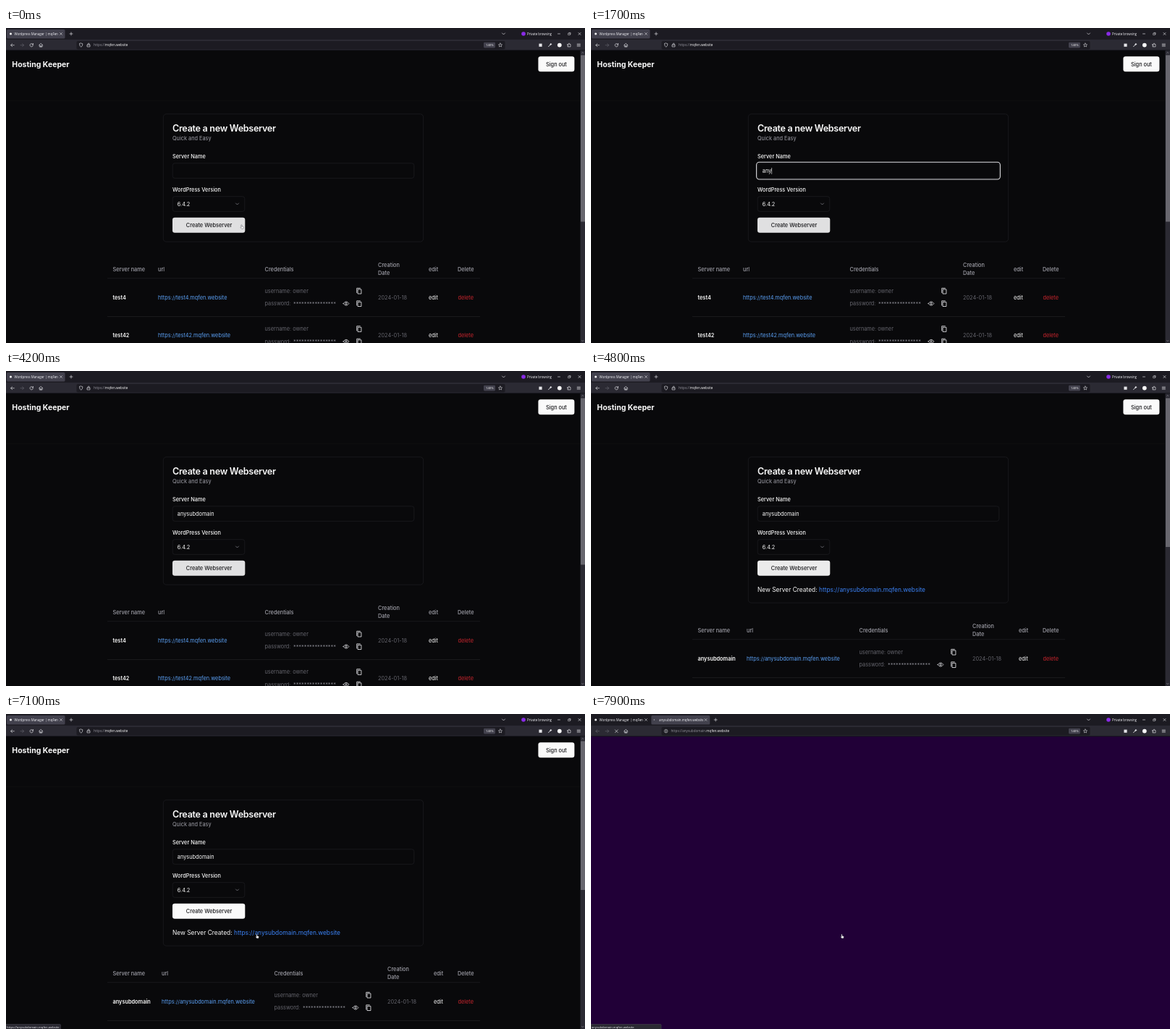
An HTML page with a canvas that plays this animation: 800 px wide and 435 px high, repeating every 8 s.

```html
<!DOCTYPE html>
<html lang="en">
<head>
<meta charset="utf-8">
<title>Web server panel</title>
<style>
  html, body { margin: 0; width: 100%; height: 100%; overflow: hidden; background: #09090b; }
  canvas { display: block; width: 100vw; height: 100vh; }
</style>
</head>
<body>
<canvas></canvas>
<script>
const W = 800, H = 435, LOOP = 8000;
const canvas = document.querySelector('canvas');
const ctx = canvas.getContext('2d');
const dpr = window.devicePixelRatio || 1;
canvas.width = W * dpr;
canvas.height = H * dpr;

const PAGE = 'Inter, sans-serif', CHROME = '"Open Sans", "Noto Sans", sans-serif';
const WHITE = '#fafafa', MUTED = '#a1a1aa', DIM = '#65656d', LINE = '#232327';
const BAR = '#1c1b22', TOOLBAR = '#2b2a33', ICON = '#e4e4e8';
const DOMAIN = 'mqfen.website', NAME = 'anysubdomain', PAGE_TITLE = 'Wordpress Manager | mqFen';

// Times at which each letter of NAME is typed.
const KEYS = [1400, 1600, 1700, 1900, 2000, 2100, 2200, 2400, 2500, 2600, 2800, 2900];
const FOCUS = 1000, CARET_OFF = 3300, SUBMIT = 3600, CREATED = 4500;
const MOVE = 6700, ARRIVE = 7000, NEW_TAB = 7200, CONNECT = 7400;

const clamp = v => Math.max(0, Math.min(1, v));
const lerp = (a, b, p) => a + (b - a) * p;
const easeOut = p => 1 - (1 - p) ** 3;

// Text is placed by the vertical centre of its capitals; returns its width.
function text(s, x, y, color = WHITE, size = 7.35, weight = 400, family = PAGE) {
  ctx.font = `${weight} ${size}px ${family}`;
  ctx.fillStyle = color;
  ctx.fillText(s, x, y + size * 0.36);
  return ctx.measureText(s).width;
}
const ui = (s, x, y, color = '#f4f4f8', size = 4.4) => text(s, x, y, color, size, 400, CHROME);

function rect(x, y, w, h, color) {
  ctx.fillStyle = color;
  ctx.fillRect(x, y, w, h);
}
function box(x, y, w, h, r, fill, stroke, lw = 0.6) {
  ctx.beginPath();
  ctx.roundRect(x, y, w, h, r);
  if (fill) { ctx.fillStyle = fill; ctx.fill(); }
  if (stroke) { ctx.strokeStyle = stroke; ctx.lineWidth = lw; ctx.stroke(); }
}
function dot(x, y, r, fill, stroke, lw = 0.6) {
  box(x - r, y - r, 2 * r, 2 * r, r, fill, stroke, lw);
}
// Strokes an SVG path around (x, y).
function icon(d, x, y, color = ICON, lw = 0.65, fill) {
  ctx.save();
  ctx.translate(x, y);
  ctx.lineWidth = lw;
  ctx.lineCap = ctx.lineJoin = 'round';
  const path = new Path2D(d);
  if (fill) { ctx.fillStyle = fill; ctx.fill(path); }
  ctx.strokeStyle = color;
  ctx.stroke(path);
  ctx.restore();
}
const CROSS = 'M-1.5-1.5L1.5 1.5M1.5-1.5L-1.5 1.5';
const PLUS = 'M-2 0H2M0-2V2';
const CHEVRON = 'M-2-1L0 1L2-1';

function tab(x, w, selected) {
  if (selected) box(x, 2, w, 12.5, 1.6, '#42414d');
}

function tabBar(t) {
  const loading = t >= NEW_TAB;
  rect(0, 0, W, 16, BAR);
  tab(1, 80.5, !loading);
  dot(6.5, 8, 1.5, WHITE);
  ui(PAGE_TITLE, 11.5, 8);
  icon(CROSS, 76, 8, ICON, 0.55);

  let plusX = 90;
  if (loading) {
    const w = lerp(8.5, 81, easeOut(clamp((t - NEW_TAB) / 100)));
    tab(83.3, w, true);
    dot(88 - 0.75 + 1.5 * (0.5 - 0.5 * Math.cos((t - NEW_TAB) / 700 * 2 * Math.PI)), 8, 0.7, '#bcbcc6');
    if (w > 60) {
      ctx.save();
      ctx.beginPath();
      ctx.rect(94, 2, 61, 13);
      ctx.clip();
      ui(`${NAME}.${DOMAIN}/`, 94, 8);
      ctx.restore();
      icon(CROSS, 158.5, 8, ICON, 0.55);
    }
    plusX = 83.3 + w + 7.9;
  }
  icon(PLUS, plusX, 8);

  icon(CHEVRON, 687.5, 8);
  dot(715, 8, 2.8, '#8a2be8');
  ui('Private browsing', 720, 8);
  icon('M-1.5 0H1.5', 764, 8);
  icon('M-1.5-.7H.8V1.6H-1.5ZM-.7-.9V-1.6H1.6V.8H1', 778.5, 8, ICON, 0.5);
  icon(CROSS, 792.5, 8);
}

function toolbar(loading) {
  rect(0, 16, W, 15, TOOLBAR);
  rect(0, 30.5, W, 0.7, '#0b0b10');
  const off = '#65646e';
  icon('M2.3 0H-2.3M-.3-2L-2.3 0L-.3 2', 9, 23.7, loading ? off : ICON);
  icon('M-2.3 0H2.3M.3-2L2.3 0L.3 2', 22.3, 23.7, off);
  if (loading) icon('M-1.9-1.9L1.9 1.9M1.9-1.9L-1.9 1.9', 35.2, 23.7);
  else icon('M2.1-.8A2.2 2.2 0 1 0 2.2.5M2.3-2.3V-.7H.7', 35.2, 23.7);
  icon('M-2.6 0L0-2.4L2.6 0M-1.9-.4V2.3H1.9V-.4M-.4 2.1V.7H.5V2.1', 48.2, 23.7);

  box(97.5, 18, 592, 11.6, 1.8, BAR);
  let x = 121;
  if (loading) {
    dot(103.6, 23.6, 2.3, null, ICON, 0.55);
    icon('M0-.2V1.2M0-1.2V-1.1', 103.6, 23.6);
    x = 110.5;
  } else {
    icon('M0-2.6L2.2-1.8Q2.3 1.4 0 2.7Q-2.3 1.4-2.2-1.8Z', 103.7, 23.6);
    icon('M-1.8-.4H1.8V2.3H-1.8ZM-1.1-.5V-1.4A1.1 1.1 0 0 1 1.1-1.4V-.5', 114.2, 23.6);
  }
  const grey = '#96959e';
  x += ui(loading ? `https://${NAME}.` : 'https://', x, 23.6, grey, 4.6);
  ui(DOMAIN, x, 23.6, WHITE, 4.6);

  box(660, 19.8, 16, 7.6, 1.3, '#42414d');
  ui('140%', 663, 23.6, WHITE, 4.2);
  icon('M0-2.6L.8-.9L2.6-.7L1.2.5L1.6 2.3L0 1.4L-1.6 2.3L-1.2.5L-2.6-.7L-.8-.9Z', 683, 23.6, ICON, 0.55);
  rect(736.4, 21.6, 4.2, 4.2, ICON);
  icon('M-2.1 2.1L.4-.4M.3-.4A1.6 1.6 0 0 1 1.4-2.3L1-.9L2.4-1.4A1.6 1.6 0 0 1 .3-.4', 751.6, 23.6, ICON, 0.9);
  dot(764.8, 23.6, 2.9, WHITE);
  icon('M-2-1H-.6V-2A.7.7 0 0 1 .7-2V-1H2V2.4H-2V1.2H-1.2V.2H-2Z', 778, 23.5);
  icon('M-2.1-1.6H2.1M-2.1 0H2.1M-2.1 1.6H2.1', 791.3, 23.6);
}

function copyIcon(x, y) {
  icon('M-1.4-2.1H3.1V4H-1.4ZM-3.1 2.5V-3.7H1.5', x, y, ICON, 0.85);
}
function eyeIcon(x, y) {
  icon('M-3.9 0Q0-5.4 3.9 0Q0 5.4-3.9 0Z', x, y, ICON, 0.8);
  dot(x, y, 1.2, null, ICON, 0.8);
}

function tableRow(name, y, col) {
  text(name, 147.5, y, WHITE, 7.35, 600);
  text(`https://${name}.${DOMAIN}`, col.url, y, '#5ba0f5');
  text('username: owner', col.cred, y - 9, DIM);
  text('password:', col.cred, y + 8.7, DIM);
  text('*'.repeat(16), col.cred + 39.5, y + 9, '#85858d');
  eyeIcon(col.cred + 112.5, y + 8.5);
  copyIcon(col.cred + 130.3, y - 9);
  copyIcon(col.cred + 130.3, y + 8.5);
  text('2024-01-18', col.date, y, DIM);
  text('edit', col.edit, y, WHITE);
  text('delete', 624.5, y, '#c9252d');
  rect(140, y + 26, 515, 0.6, LINE);
}

function table(created) {
  const col = created
    ? { url: 215, cred: 370.5, date: 527, edit: 591 }
    : { url: 210, cred: 357.5, date: 514, edit: 584 };
  const y = created ? 358 : 333;
  const heads = [['Server name', 147.5], ['url', col.url], ['Credentials', col.cred], ['edit', col.edit], ['Delete', 624]];
  for (const [label, x] of heads) text(label, x, y, MUTED, 7.35, 500);
  text('Creation', col.date, y - 5.2, MUTED, 7.35, 500);
  text('Date', col.date, y + 5.3, MUTED, 7.35, 500);
  rect(140, y + 12.5, 515, 0.6, LINE);
  const names = created ? [NAME, 'test4'] : ['test4', 'test42'];
  names.forEach((name, i) => tableRow(name, y + 39 + i * 52.4, col));
}

function form(t, created) {
  box(217.3, 118.8, 359.3, created ? 201.4 : 176.4, 4.2, '#09090b', LINE);
  ctx.letterSpacing = '-0.315px';
  text('Create a new Webserver', 230, 138, WHITE, 12.6, 600);
  ctx.letterSpacing = '0px';
  text('Quick and Easy', 230, 152.7, MUTED);
  text('Server Name', 230, 177, WHITE, 7.35, 500);
  box(230.2, 186.8, 333.6, 20.6, 3, null, LINE);
  const focused = t >= FOCUS && t < SUBMIT;
  if (focused) box(228.6, 185.2, 336.8, 23.8, 4, null, '#dadade', 1.1);
  const typed = NAME.slice(0, KEYS.filter(k => t >= k).length);
  const width = text(typed, 236.8, 197.3);
  if (focused && t < CARET_OFF) rect(237 + width, 193, 0.6, 8.8, WHITE);

  text('WordPress Version', 230, 223, WHITE, 7.35, 500);
  box(230.2, 232.7, 99.6, 20.6, 3, null, LINE);
  text('6.4.2', 236.8, 243.2);
  icon(CHEVRON, 319.5, 243, '#8b8b92', 0.7);

  const fill = t >= MOVE + 100 ? WHITE : created ? '#ebebeb' : '#e0e0e1';
  box(230, 261.7, 100.3, 21, 3.2, fill);
  text('Create Webserver', 248.8, 272.2, '#18181b', 7.35, 500);
  if (created) {
    const w = text('New Server Created: ', 230, 301.5, WHITE, 8.4);
    text(`https://${NAME}.${DOMAIN}`, 230 + w, 301.5, '#3b82f6', 8.4);
  }
}

function scrollbar(created) {
  rect(793.5, 31, 6.5, 404, TOOLBAR);
  rect(794, 37.5, 6, created ? 205.5 : 230, '#68676f');
  icon('M-1.2.6L0-.6L1.2.6', 796.8, 34.2, '#9a9aa2', 0.6);
  icon('M-1.2-.6L0 .6L1.2-.6', 796.8, 432, '#9a9aa2', 0.6);
}

function page(t) {
  const created = t >= CREATED;
  rect(0, 31, W, H - 31, '#09090b');
  rect(0, 100, 793.5, 0.6, '#0f0f12');
  text('Hosting Keeper', 8.3, 50, WHITE, 10.5, 700);
  box(735.4, 39.3, 50, 21, 3.2, WHITE);
  text('Sign out', 746, 50, '#18181b', 7.35, 500);
  form(t, created);
  table(created);
  scrollbar(created);
}

function status(s, w) {
  box(-1, 428.5, w + 1, 8, 1, TOOLBAR, '#4a4954', 0.5);
  ui(s, 1, 432.2, '#f0f0f4', 4.15);
}

function pointer(t) {
  if (t >= KEYS[0] && t < MOVE) return;
  const p = t < MOVE ? 0 : easeOut(clamp((t - MOVE) / (ARRIVE - MOVE)));
  icon('M-1-2.6Q-.4-3.2 0-2.5V-.7L2 0Q2.5.3 2.2 1.3L1.7 2.8H-.5L-2.1.8Q-2 .1-1 .6Z',
    lerp(326, 347, p), lerp(274.5, 307, p), '#55555c', 0.5, '#ffffff');
}

function draw(t) {
  ctx.setTransform(dpr, 0, 0, dpr, 0, 0);
  const loading = t >= NEW_TAB;
  if (loading) rect(0, 31, W, H - 31, '#210037');
  else page(t);
  tabBar(t);
  toolbar(loading);
  if (t >= CONNECT) status(`${NAME}.${DOMAIN}`, 97);
  else if (t >= ARRIVE && !loading) status(`https://${NAME}.${DOMAIN}`, 75.5);
  pointer(t);
}

const start = performance.now();
function tick() {
  draw((performance.now() - start) % LOOP);
  requestAnimationFrame(tick);
}
tick();
</script>
</body>
</html>
```
